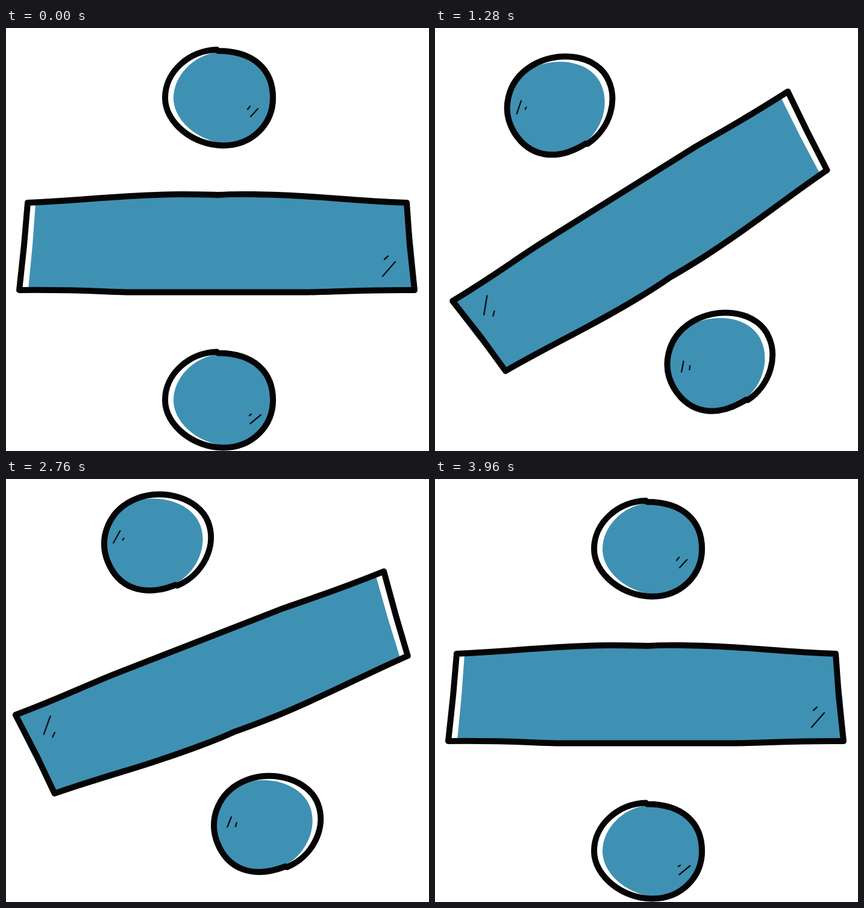
Animation, 702 px wide and 702 px high, one loop 4 s. Source, as an HTML page:

```html
<!DOCTYPE html>
<html lang="en">
<head>
<meta charset="utf-8">
<title>Spinning division sign</title>
<style>
  html, body { margin: 0; width: 100%; height: 100%; overflow: hidden; background: #fff; }
  svg { display: block; width: 100%; height: 100%; }
  .fill { fill: #3f91b3; }
  .line { fill: none; stroke: #050506; stroke-width: 10; stroke-linecap: round; stroke-linejoin: round; }
  .shine { fill: none; stroke: #0b1216; stroke-width: 2.4; stroke-linecap: round; }
</style>
</head>
<body>
<svg viewBox="0 0 702 702">
  <defs>
    <g id="dot">
      <path class="fill" d="M352 40C310 45 278 80 278 116C278 155 320 187 360 191C410 195 448 158 448 116C448 72 412 38 352 40Z"/>
      <path class="line" d="M350 36C305 37 264 72 264 116C264 158 312 195 360 195C410 195 443 158 443 116C443 70 412 38 352 38"/>
    </g>
  </defs>
  <g id="sign">
    <use href="#dot"/>
    <use href="#dot" y="501.5"/>
    <path class="fill" d="M49 291C130 286 190 277 290 276H410C510 277 560 286 667 291L676 362L682 432L500 437H200L37 433L44 360Z"/>
    <path class="line" d="M36 290C130 286 190 277 290 276Q330 276 351 277Q375 275.500 410 276C510 277 560 286 665 290L670 360L678 435C590 434 560 438 500 438.500H200C150 437 110 434 22 435L30 360Z"/>
    <path class="shine" d="M401 135L405 130M406 147L418 134M628 384L634 378.500M625 412L646 388M404 643L407 641M405.500 656.500L423 642"/>
  </g>
</svg>
<script>
  const STEP = 40, STEPS = 100;
  const sign = document.getElementById('sign');

  // [step, angle in degrees, speed in degrees per step]
  const keys = [
    [0, 0, -4.5], [14, 0.3, 3], [22, 50.8, 9.8], [32, 148, 8], [40, 180, 0],
    [59, 180, 0], [59, 180, -4.6], [73, 167.8, 3.8], [77, 189.7, 8.2],
    [85, 270, 10.2], [91, 328.6, 8], [99, 360, 0], [100, 360, 0]
  ];

  // Cubic Hermite curve through the keys
  function angleAt(step) {
    const i = keys.findIndex(k => k[0] > step);
    const [s0, a0, v0] = keys[i - 1], [s1, a1, v1] = keys[i];
    const span = s1 - s0, u = (step - s0) / span, w = 1 - u;
    return a0 + (a1 - a0) * u * u * (3 - 2 * u) + span * u * w * (v0 * w - v1 * u);
  }

  let start;
  function draw(now) {
    start ??= now;
    const step = Math.floor((now - start) / STEP) % STEPS;
    sign.setAttribute('transform', `rotate(${angleAt(step)} 351 351)`);
    requestAnimationFrame(draw);
  }
  requestAnimationFrame(draw);
</script>
</body>
</html>
```
